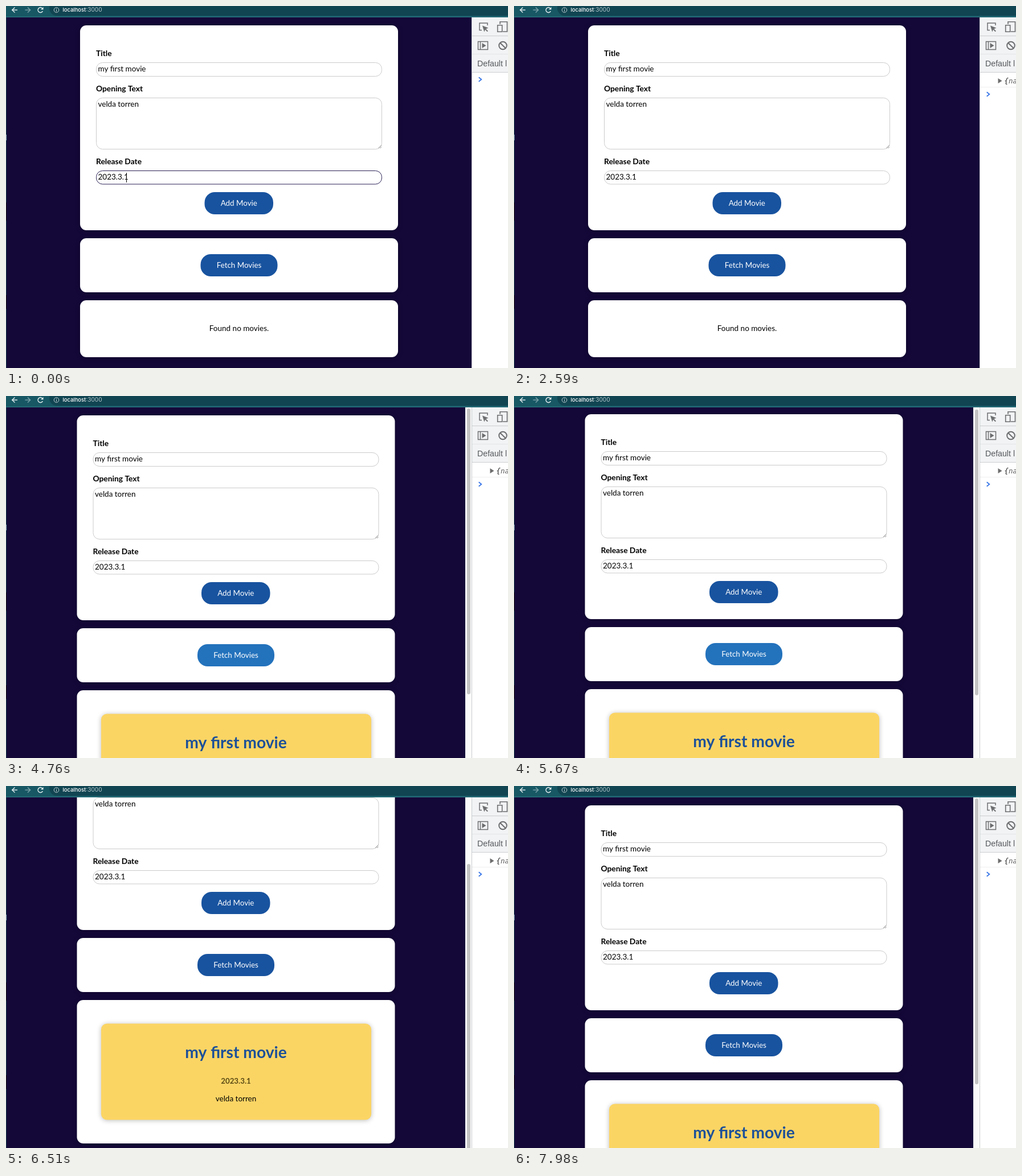
Recreate the animation shown at these times as an HTML page with a canvas. Size 881 by 636 pixels, loop 8000 ms.

```html
<!DOCTYPE html>
<html lang="en">
<head>
<meta charset="utf-8">
<title>Movie form</title>
<style>
html, body { margin: 0; width: 100%; height: 100%; overflow: hidden; background: #140839; }
canvas { display: block; }
</style>
</head>
<body>
<canvas id="stage" width="881" height="636"></canvas>
<script>
const ctx = document.getElementById('stage').getContext('2d');
const LOOP = 8000, PAGE_TOP = 20, PAGE_RIGHT = 817;
const NAVY = '#140839', BLUE = '#18539f', BLUE_HOVER = '#2372bc', ICON = '#6c6e70';
const PLOT = 'velda torren';

// [time, scroll offset]; each value holds until the next
const SCROLL = [
  [0, 0], [5670, 2], [5740, 22], [5810, 68], [5880, 110], [5950, 134], [6020, 142],
  [6510, 141], [6580, 105], [6650, 52], [6720, 14], [6790, 0]
];

const within = (t, a, b) => t >= a && t < b;

function stateAt(t) {
  return {
    caret: t < 70 || within(t, 630, 910),
    focus: t < 910,
    addHover: within(t, 700, 2590) || within(t, 7140, 7210),
    fetchHover: within(t, 4130, 6300) || within(t, 7070, 7140),
    logged: t >= 1470,
    loading: within(t, 4480, 4690),
    loaded: t >= 4690,
    scroll: SCROLL.filter(k => k[0] <= t).pop()[1]
  };
}

function rect(x, y, w, h, fill) {
  ctx.fillStyle = fill;
  ctx.fillRect(x, y, w, h);
}

function round(x, y, w, h, r, fill, stroke) {
  ctx.beginPath();
  ctx.roundRect(x, y, w, h, r);
  if (fill) { ctx.fillStyle = fill; ctx.fill(); }
  if (stroke) { ctx.strokeStyle = stroke; ctx.lineWidth = 1; ctx.stroke(); }
}

function line(points, color, width = 1) {
  ctx.beginPath();
  points.forEach(p => ctx.lineTo(p[0], p[1]));
  ctx.strokeStyle = color;
  ctx.lineWidth = width;
  ctx.stroke();
}

function poly(points, fill) {
  ctx.beginPath();
  points.forEach(p => ctx.lineTo(p[0], p[1]));
  ctx.closePath();
  ctx.fillStyle = fill;
  ctx.fill();
}

function circle(x, y, r, color, width, from = 0, to = Math.PI * 2) {
  ctx.beginPath();
  ctx.arc(x, y, r, from, to);
  ctx.strokeStyle = color;
  ctx.lineWidth = width;
  ctx.stroke();
}

function text(str, x, y, font, color = '#000', align = 'left') {
  ctx.font = font;
  ctx.fillStyle = color;
  ctx.textAlign = align;
  ctx.fillText(str, x, y);
}

const lato = (size, weight = 400) => `${weight} ${size}px Lato, sans-serif`;
const BODY = lato(13.5), LABEL = lato(13.8, 700);

function shadow(on) {
  ctx.shadowColor = on ? 'rgba(0,0,0,.27)' : 'transparent';
  ctx.shadowBlur = on ? 8 : 0;
  ctx.shadowOffsetY = on ? 1 : 0;
}

function card(y, h) {
  shadow(true);
  round(130, y, 558, h, 11, '#fff');
  shadow(false);
}

function field(label, value, y, h, focused) {
  text(label, 158, y - 11.5, LABEL);
  round(158.5, y + .5, 501, h - 1, 11, '#fff', focused ? '#2a1f55' : '#cbcbcb');
  text(value, 161.5, y + 15.5, BODY);
}

function button(label, x, y, w, hover) {
  round(x, y, w, 39, 18, hover ? BLUE_HOVER : BLUE);
  text(label, x + w / 2, y + 23.5, lato(13.4), '#fff', 'center');
}

function movie() {
  shadow(true);
  round(172.5, 558.5, 474, 169, 10, '#fbd564');
  shadow(false);
  text('my first movie', 409, 619, lato(28.2, 700), '#1c5099', 'center');
  text('2023.3.1', 409, 664, lato(13.3, 700), '#5a4a14', 'center');
  text(PLOT, 409, 694.5, BODY, '#000', 'center');
}

function drawPage(s) {
  ctx.save();
  ctx.beginPath();
  ctx.rect(0, PAGE_TOP, PAGE_RIGHT, 636);
  ctx.clip();
  rect(0, PAGE_TOP, PAGE_RIGHT, 636, NAVY);

  ctx.save();
  ctx.translate(s.loaded ? -5.5 : 0, -s.scroll);
  card(34, 360);
  field('Title', 'my first movie', 99, 25);
  field('Opening Text', PLOT, 161, 91);
  line([[653.5, 250], [659, 244.5]], '#8a8a8a');
  line([[656.5, 250], [659, 247.5]], '#8a8a8a');
  field('Release Date', '2023.3.1', 289, 24.5, s.focus);
  if (s.caret) rect(211, 293, 1, 17, '#000');
  button('Add Movie', 348.5, 327, 120.5, s.addHover);

  card(408, 95);
  button('Fetch Movies', 341.5, 436, 135, s.fetchHover);

  card(517, s.loaded ? 252 : 100);
  if (s.loaded) movie();
  else text(s.loading ? 'Loading...' : 'Found no movies.', 409, 570.5, BODY, '#000', 'center');
  ctx.restore();

  if (s.loaded) {
    rect(806, PAGE_TOP, 11, 616, '#fafafa');
    round(809, 22 + s.scroll * .816, 6, 502, 3, '#c3c3c3');
  }
  rect(0, PAGE_TOP, 1, 616, '#173c4b');
  rect(0, 226, 1, 10, '#8fc0cc');
  rect(0, 345, 1, 32, '#1c1718');
  rect(0, 508, 1, 24, '#1c1718');
  ctx.restore();
}

function arrow(x, dir, color) {
  line([[x - 5 * dir, 7], [x + 4.5 * dir, 7]], color, 1.4);
  line([[x, 2.5], [x - 4.6 * dir, 7], [x, 11.5]], color, 1.4);
}

function drawBrowserBar() {
  rect(0, 0, 881, 20, '#185865');
  round(76, -10, 830, 27, 13, '#114552');
  rect(0, 18.5, 881, 1.5, '#25707c');
  arrow(15.5, 1, '#e6f0f1');
  arrow(38, -1, '#7ba3aa');
  circle(60.5, 7, 4.4, '#e6f0f1', 1.5, .5, 5.4);
  poly([[65.5, 1.8], [65.5, 6.2], [61, 6.2]], '#e6f0f1');
  circle(88.5, 7, 4.3, '#c3d2d5', 1);
  rect(88, 6.3, 1, 3.3, '#c3d2d5');
  rect(88, 4.2, 1, 1.1, '#c3d2d5');
  text('localhost', 99.5, 10.3, '500 9.4px Inter, sans-serif', '#fff');
  text(':3000', 140.3, 10.3, '400 10.1px Inter, sans-serif', '#b5c8cc');
}

function drawDevTools(s) {
  rect(PAGE_RIGHT, 20, 64, 616, '#fff');
  rect(PAGE_RIGHT, 20, 64, 97, '#f1f3f4');
  rect(PAGE_RIGHT, 52, 64, 1, '#cbcdd1');
  rect(PAGE_RIGHT, 84, 64, 1, '#e3e5e8');
  rect(PAGE_RIGHT, 116, 64, 1, '#cbcdd1');
  rect(PAGE_RIGHT, 20, 1, 616, '#cbcdd1');

  // inspect
  line([[835, 42.5], [831, 42.5], [831, 30], [845, 30], [845, 34]], ICON, 1.5);
  poly([[836, 34.5], [846.5, 38.5], [842.3, 40.2], [846, 44], [844.5, 45.3],
    [841, 41.6], [839.3, 45.5]], ICON);
  // device
  line([[867, 32], [867, 27.7], [879.5, 27.7], [879.5, 45], [872, 45]], ICON, 1.6);
  round(862.7, 33.7, 8, 11.6, 1, '#f1f3f4');
  line([[862.7, 33.7], [870.7, 33.7], [870.7, 45.3], [862.7, 45.3], [862.7, 33]], ICON, 1.6);
  // sidebar
  line([[828.5, 62.5], [845.5, 62.5], [845.5, 76.5], [828.5, 76.5], [828.5, 61.8]], ICON, 1.5);
  line([[832.5, 62], [832.5, 77]], ICON, 1.4);
  poly([[835.5, 65], [842.5, 69.5], [835.5, 74]], ICON);
  // clear
  circle(872, 69.5, 6.8, ICON, 2);
  line([[867.2, 64.7], [876.8, 74.3]], ICON, 2);

  text('Default l', 827, 106, '14.2px "Liberation Sans", Arial, sans-serif', '#56595d');

  if (s.logged) {
    poly([[849.5, 127], [856.5, 131.5], [849.5, 136]], '#6e6e6e');
    const mono = 'italic 12.4px "DejaVu Sans Mono", monospace';
    text('{', 860.5, 136, mono, '#222');
    text('na', 868, 136, mono, '#5c5c5c');
    rect(818, 142, 63, 1, '#efefef');
  }
  const y = s.logged ? 155 : 129;
  line([[829.7, y - 3.7], [834.3, y], [829.7, y + 3.7]], '#3b78e7', 1.8);
}

function frame(now) {
  const s = stateAt(now % LOOP);
  drawPage(s);
  drawBrowserBar();
  drawDevTools(s);
}

const start = performance.now();
function tick() {
  frame(performance.now() - start);
  requestAnimationFrame(tick);
}
tick();
</script>
</body>
</html>
```
